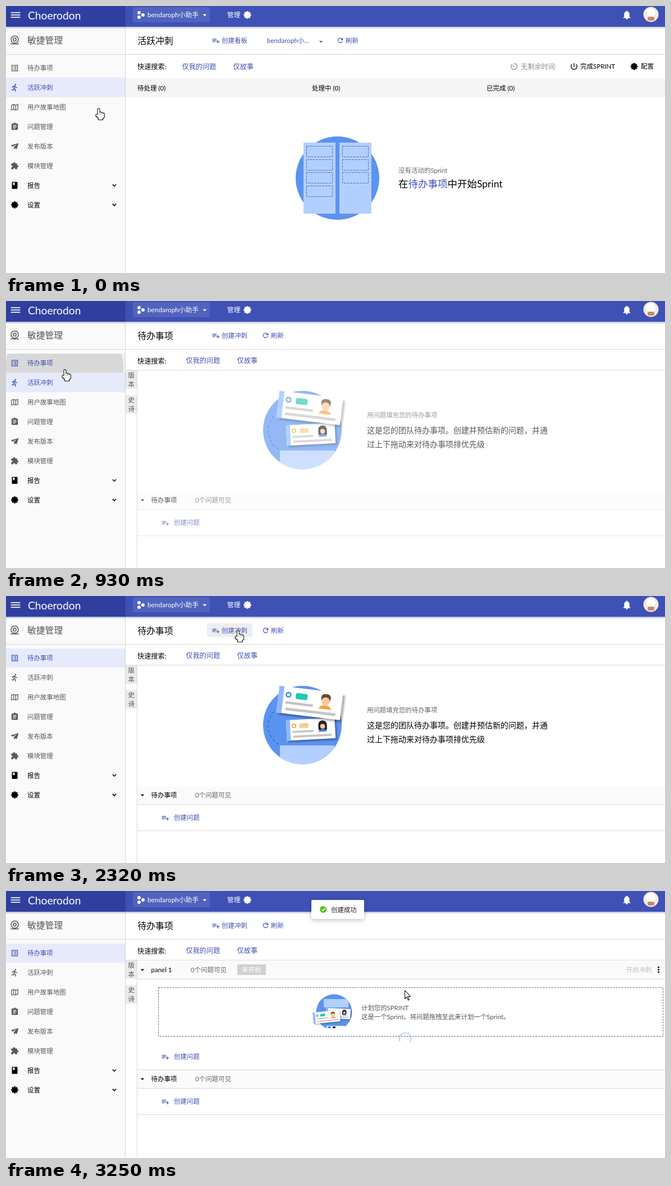
Recreate the animation shown at these times as an HTML page with a canvas. Size 1174 by 477 pixels, loop 3.32 s.

```html
<!DOCTYPE html>
<html lang="zh-CN">
<head>
<meta charset="utf-8">
<title>待办事项</title>
<style>
html, body { margin: 0; width: 100%; height: 100%; overflow: hidden; background: #fff; }
canvas { display: block; width: 1174px; height: 477px; }
</style>
</head>
<body>
<canvas id="c" width="1174" height="477"></canvas>
<script>
const g = document.getElementById('c').getContext('2d');
const FONT = 'Lato, "Noto Sans CJK SC", "Noto Sans CJK", sans-serif';
const LOOP = 3320, STEP = LOOP / 43;
const BLUE = '#3f51b5', SKY = '#5b93f0', PALE = '#b3cfff', GREY = '#595959', LINE = '#d8d8d8';
const OPEN = 770, CREATED = 2940;

const ramp = (t, a, b) => Math.min(1, Math.max(0, (t - a) / (b - a)));
const pulse = (t, a, b, c, d) => ramp(t, a, b) - ramp(t, c, d);
const tint = k => `rgb(${89 - 26 * k},${89 - 8 * k},${89 + 92 * k})`;

function rect(x, y, w, h, c) { g.fillStyle = c; g.fillRect(x, y, w, h); }
function round(x, y, w, h, r, c) { g.fillStyle = c; g.beginPath(); g.roundRect(x, y, w, h, r); g.fill(); }
function disc(x, y, r, c) { g.fillStyle = c; g.beginPath(); g.arc(x, y, r, 0, 7); g.fill(); }
function arc(x, y, r, a, b, c, w) {
  g.strokeStyle = c; g.lineWidth = w; g.beginPath(); g.arc(x, y, r, a, b); g.stroke();
}
function ring(x, y, r, c, w) { arc(x, y, r, 0, 7, c, w); }
function trace(p) {
  g.beginPath();
  for (let i = 0; i < p.length; i += 2) g.lineTo(p[i], p[i + 1]);
}
function line(c, w, ...p) { g.strokeStyle = c; g.lineWidth = w; trace(p); g.stroke(); }
function poly(c, ...p) { g.fillStyle = c; trace(p); g.fill(); }
function dashed(pattern, paint) { g.setLineDash(pattern); paint(); g.setLineDash([]); }
function frame(x, y, w, h, c, lw = 1) { g.strokeStyle = c; g.lineWidth = lw; g.strokeRect(x, y, w, h); }
function place(x, y, scale, angle, paint) {
  g.save(); g.translate(x, y); g.rotate(angle); g.scale(scale, scale); paint(); g.restore();
}
function clipTo(path, paint) { g.save(); g.beginPath(); path(); g.clip(); paint(); g.restore(); }
function text(s, x, y, size, c, weight = 400) {
  g.font = `${weight} ${size}px ${FONT}`;
  g.fillStyle = c;
  g.fillText(s, x, y + size * .37);
}

// icons live on a grid of 24 units centred on 0,0
const ICON = {
  menu(c) { for (const y of [-6, -1, 4]) rect(-10, y, 20, 2, c); },
  list(c) {
    frame(-8, -8, 16, 16, c, 2);
    for (const y of [-5, -1, 3]) { rect(-5, y, 2, 2, c); rect(-1, y, 6, 2, c); }
  },
  run(c) {
    disc(2, -8.5, 2.1, c);
    line(c, 2.2, -6, 1, -6, -3, 0, -5, 3, -1, 7, 0);
    line(c, 2.4, 0, -5, -2, 2, 2, 5, 2, 11);
    line(c, 2.2, -2, 2, -3.5, 7, -9, 6);
  },
  map(c) {
    line(c, 2, -9, -6, -3, -8, 3, -6, 9, -8, 9, 6, 3, 8, -3, 6, -9, 8, -9, -7);
    line(c, 2, -3, -8, -3, 6);
    line(c, 2, 3, -6, 3, 8);
  },
  task(c) {
    round(-9, -9, 18, 18, 2, c); disc(0, -9, 3, c);
    for (let i = 0; i < 3; i++) rect(-5, -5 + 4 * i, i < 2 ? 10 : 7, 2, '#fafafa');
  },
  plane(c) { poly(c, 11, -9, -11, -3, -6, 1, 6, -6, -2, 2, -2, 10, 1, 6, 6, 8); },
  puzzle(c) {
    round(-10, -7, 17, 17, 2, c);
    disc(-1.5, -7.5, 3, c); disc(7.5, 1.5, 3, c);
    disc(-9, 1.5, 2.7, '#fafafa'); disc(-1.5, 9, 2.7, '#fafafa');
  },
  book(c) { round(-8, -10, 16, 20, 2, c); poly('#fff', -5, -8, 0, -8, 0, 0, -2.5, -2, -5, 0); },
  gear(c) {
    for (let i = 0; i < 4; i++) place(0, 0, 1, i * Math.PI / 4, () => rect(-2.5, -10, 5, 20, c));
    ring(0, 0, 5.5, c, 4);
  },
  add(c) {
    for (let i = 0; i < 3; i++) rect(-11, -6 + 4 * i, i < 2 ? 13 : 9, 2, c);
    rect(1, 2, 10, 2, c); rect(5, -2, 2, 10, c);
  },
  refresh(c) { arc(0, 0, 7, .3, 5.5, c, 2); poly(c, 8, -8, 8, -1, 1, -1); },
  bell(c) { round(-6, -8, 12, 14, [6, 6, 0, 0], c); rect(-8, 5, 16, 2, c); disc(0, -8, 1.6, c); disc(0, 8, 2, c); },
  down(c) { line(c, 2.6, -5.5, -2, 0, 3.5, 5.5, -2); },
  caret(c) { poly(c, -6, -3, 6, -3, 0, 3); },
  power(c) { arc(0, 0, 8, -.8, 3.94, c, 2); rect(-1, -9, 2, 10, c); },
  clock(c) { arc(0, 0, 8, -1.5, 3.9, c, 2); line(c, 2, -4, -4, 1, 1); }
};
function icon(name, x, y, size, c) { place(x, y, size / 24, 0, () => ICON[name](c)); }
function link(name, label, x, y) {
  icon(name, x, y, 14, BLUE);
  text(label, x + (name === 'add' ? 10 : 9.5), y, 11.5, BLUE);
}

function header() {
  const fade = g.createLinearGradient(0, 37, 0, 41);
  fade.addColorStop(0, 'rgba(63,81,150,.4)');
  fade.addColorStop(1, 'rgba(63,81,150,0)');
  rect(0, 37, 1174, 4, fade);
  rect(0, 0, 1174, 37, BLUE);
  rect(0, 0, 213, 37, '#303f9f');
  icon('menu', 17, 16, 20, '#fff');
  text('Choerodon', 39, 17, 19.2, '#fff');
  round(226, 2, 137, 27, 2, '#5263bd');
  disc(237, 12, 3, '#fff'); disc(237, 20, 3, '#fff'); disc(244, 16, 3, '#fff');
  text('bendaroph小助手', 252, 16, 11.8, '#fff');
  icon('caret', 354, 16.5, 14, '#fff');
  text('管理', 394, 16, 11.8, '#fff', 500);
  icon('gear', 430, 16, 16, '#fff');
  icon('bell', 1106, 16, 19, '#fff');
  disc(1149, 15, 13.5, '#f3e9e4');
  disc(1149, 12, 8, '#fff');
  round(1143, 19, 12, 7, 3, '#c98a68');
}

const ITEMS = { list: '待办事项', run: '活跃冲刺', map: '用户故事地图', task: '问题管理',
  plane: '发布版本', puzzle: '模块管理', book: '报告', gear: '设置' };

function ripple(t) {
  clipTo(() => g.rect(0, 94, 212, 34), () => {
    g.globalAlpha = pulse(t, 610, 612, 930, 1160);
    disc(104, 122, 15 + 90 * ramp(t, 600, 926), '#d8d8d8');
  });
}

function sidebar(t) {
  rect(0, 37, 212, 440, '#fafafa');
  rect(212, 37, 1, 440, '#d3d3d3');
  ring(15.5, 60, 6.5, GREY, 1.5); ring(15.5, 60, 2.7, GREY, 1.5);
  rect(8, 67, 15, 1.5, GREY);
  text('敏捷管理', 38, 61, 15.8, '#555');
  const moved = t > 1070;
  if (moved) rect(0, 94, 212, 34, t < 1400 ? '#dde0ee' : '#e7eafb');
  else {
    if (t > 300) rect(0, 94, 212, 34, '#f0f0f0');
    rect(0, 128, 212, 35, '#e7eafb');
  }
  ripple(t);
  const glow = { list: ramp(t, 240, 380), run: 1 - ramp(t, 1250, 1550), map: .7 * pulse(t, 60, 160, 240, 380) };
  Object.entries(ITEMS).forEach(([name, label], i) => {
    const y = 111 + 34.9 * i, strong = i > 5, c = strong ? '#000' : tint(glow[name] || 0);
    icon(name, 15.5, y, 15, c);
    text(label, 38, y, 11.45, c, strong ? 500 : 400);
    if (strong) icon('down', 193, y - .5, 14, '#000');
  });
}

function filters(x, y, labelY) {
  text('快速搜索:', 234, labelY, 12.2, '#000');
  text('仅我的问题', x, y, 12.2, BLUE);
  text('仅故事', x + 91, y, 12.2, BLUE);
}

function board() {
  disc(590.5, 307.5, 74.5, SKY);
  for (let col = 0; col < 2; col++) {
    const x = 530 + 64 * col;
    rect(x, 244, 57, 127, PALE);
    dashed([4, 1.5], () => {
      for (let r = 0; r < 4 - col; r++) frame(x + 5.5, 250.5 + Math.round(23.7 * r), 46, 19, '#4674c6');
    });
  }
}

function sprintPage() {
  text('活跃冲刺', 234.5, 62, 15.8, '#000');
  link('add', '创建看板', 374, 62);
  text('bendaroph小...', 465, 62, 11.6, BLUE);
  icon('caret', 561, 64, 13, BLUE);
  link('refresh', '刷新', 595.5, 61.5);
  filters(313.5, 108, 108);
  icon('clock', 905, 108, 16, '#8c8c8c');
  text('无剩余时间', 917, 108, 12.2, '#8c8c8c');
  icon('power', 1012, 108, 16, '#000');
  text('完成SPRINT', 1023, 108, 11.5, '#000');
  icon('gear', 1119, 108, 15, '#000');
  text('配置', 1131, 108, 11.5, '#000', 500);
  rect(213, 129, 961, 34, '#f5f5f5');
  ['待处理', '处理中', '已完成'].forEach((s, i) => text(s + ' (0)', 234 + 311 * i, 147, 11.5, '#000'));
  board();
  text('没有活动的Sprint', 699, 294, 11.5, '#666');
  text('在', 699, 317.5, 17.5, '#000');
  text('待办事项', 716.5, 317.5, 17.5, BLUE);
  text('中开始Sprint', 786.5, 317.5, 17.5, '#000');
}

function backlogBar(t) {
  text('待办事项', 234.5, 62, 15.8, '#000');
  const press = ramp(t, 2410, 2570);
  if (t > 1840 && t < 2860) round(358 - press, 49 - press, 81 + 2 * press, 24 + 2 * press, 2, press ? '#d6d6d6' : '#eee');
  link('add', '创建冲刺', 374, 62);
  link('refresh', '刷新', 462.5, 61.5);
  filters(320.5, 106, 107.5);
  rect(213, 123, 961, 1, LINE);
  rect(233, 124, 1, 353, LINE);
  ['版本', '史诗'].forEach((s, i) => {
    const y = 124 + 44 * i;
    rect(213, y, 20, 33, '#eaeaea');
    [...s].forEach((ch, j) => text(ch, 217.5, y + 9 + 16 * j, 11.5, '#555'));
  });
}

function group(y, name, count, x) {
  rect(234, y - 16, 940, 32, '#fafafa');
  rect(234, y + 16, 940, 1, LINE);
  icon('caret', 243, y, 13, '#000');
  text(name, 258.5, y, 11.5, '#000');
  text(count, x, y, 11.5, '#666');
}
function addIssue(y, bottom) {
  icon('add', 284, y + .5, 14, BLUE);
  text('创建问题', 299, y, 11.5, BLUE);
  rect(234, bottom, 940, 1, LINE);
}
function backlogGroup(y) {
  group(y, '待办事项', '0个问题可见', 337);
  addIssue(y + 40, y + 63);
}

function man() {
  g.fillStyle = '#f5a540';
  g.beginPath(); g.ellipse(0, 15, 11, 7, 0, Math.PI, 0); g.fill();
  rect(-3, 4, 6, 6, '#f0b183');
  round(-8.5, -12, 17, 14, 6, '#6b4630');
  round(-7, -6, 14, 14, 6, '#fbc79c');
}
function woman() {
  round(-10, -12, 20, 22, [9, 9, 2, 2], '#23202c');
  g.fillStyle = '#4b7de0';
  g.beginPath(); g.ellipse(0, 14, 10, 6, 0, Math.PI, 0); g.fill();
  round(-5.5, -4, 11, 11, 5, '#fbc79c');
}
function card(x, y, scale, angle, mark, tag, face) {
  place(x, y, scale, angle, () => {
    g.save();
    g.shadowColor = 'rgba(0,0,0,.3)'; g.shadowBlur = 3; g.shadowOffsetX = 4 * scale; g.shadowOffsetY = 4 * scale;
    rect(-57, -24, 114, 48, '#fff');
    g.restore();
    rect(-57, -24, 9, 48, '#8fb8ff');
    ring(-39, -10, 4, mark, 2.5);
    round(-26, -15, 21, 11, 3, tag);
    rect(-43, 2, 49, 4.5, '#c4c4c4');
    rect(-42, 13, 90, 5, '#c4c4c4');
    place(28, -7, 1, 0, face);
  });
}
const blueCard = (x, y, scale, angle) => card(x, y, scale, angle, '#4b84e6', '#22c9b4', man);
const tanCard = (x, y, scale, angle) => card(x, y, scale, angle, '#f5a540', '#f8cd8a', woman);

function emptyBacklog() {
  disc(528, 230.5, 70, SKY);
  dashed([5, 4], () => arc(505, 232, 38, 2.1, 3.9, '#3568b8', 1.5));
  clipTo(() => g.arc(528, 230.5, 70, 0, 7), () => rect(488, 267, 97, 40, PALE));
  tanCard(543, 238, .76, -.05);
  blueCard(541, 191, 1, .12);
  text('用问题填充您的待办事项', 643, 203.5, 11.4, '#666');
  text('这是您的团队待办事项。创建并预估新的问题，并通', 643, 231, 14, '#000');
  text('过上下拖动来对待办事项排优先级', 643, 256, 14, '#000');
  backlogGroup(356);
}

function sprintBacklog() {
  group(141, 'panel 1', '0个问题可见', 329);
  rect(412, 131, 51, 19, '#d0d0d0');
  text('未开始', 420, 141, 11.5, '#fff', 500);
  text('开启冲刺', 1104.5, 141, 11.5, '#bfbfbf');
  for (let i = -1; i < 2; i++) disc(1162.5, 140.5 + 4.3 * i, 1.5, '#000');
  dashed([3, 2], () => frame(271.5, 172.5, 899, 87, '#666'));
  clipTo(() => g.arc(584.5, 216.5, 32, 0, 7), () => {
    rect(552, 184, 66, 66, SKY);
    rect(566, 193, 44, 15, PALE);
    tanCard(592, 219, .38, .05);
    rect(571, 241, 32, 8, '#fff');
    rect(573, 242, 6, 3, '#4b84e6'); rect(582, 242, 5, 3, '#23202c');
  });
  blueCard(571, 225, .42, -.1);
  text('计划您的SPRINT', 633, 208.5, 11.4, '#555');
  text('这是一个Sprint。将问题拖拽至此来计划一个Sprint。', 633, 225, 11.4, '#555');
  addIssue(296, 319);
  backlogGroup(336);
}

function spinner(t) {
  const again = t > 2000;
  g.globalAlpha = again ? ramp(t, 2700, 2860) - .65 * ramp(t, 3090, 3240) : pulse(t, 930, 1080, 1240, 1420);
  const turn = again ? 2.6 + (t - 3240) * .0063 : .7 + (t - 1235) * .0063;
  arc(711, 264, 10.5, turn, turn + (again ? 4.3 : 2.4), '#4a82e0', 2);
  g.globalAlpha = 1;
}

function toast(t) {
  const k = ramp(t, 2780, 3000);
  if (!k) return;
  place(544, 50 * k - 34, 1, 0, () => {
    g.globalAlpha = k;
    g.shadowColor = 'rgba(0,0,0,.25)'; g.shadowBlur = 8; g.shadowOffsetY = 2;
    round(0, 0, 94, 34, 2, '#fff');
    g.shadowColor = 'transparent';
    disc(21, 17, 6, '#52c41a');
    line('#fff', 1.5, 18, 17, 20.5, 19.5, 24.5, 14.5);
    text('创建成功', 35, 17.5, 11.4, '#222');
  });
}

// stops of the pointer: time, x, y
const PATH = [[0, 165, 182.5], [386, 105, 119.5], [463, 105, 122], [1080, 105, 122], [1235, 157, 125],
  [1621, 418, 97], [1920, 402, 56], [2410, 416, 62.5], [2700, 416, 62.5], [3090, 583, 134], [3240, 710.5, 177.5]];

function pointerAt(t) {
  let [, x, y] = PATH[0];
  for (let i = 1; i < PATH.length; i++) {
    const k = ramp(t, PATH[i - 1][0], PATH[i][0]);
    x += (PATH[i][1] - x) * k;
    y += (PATH[i][2] - y) * k;
  }
  return [x, y];
}
function hand() {
  for (const [grow, c] of [[.5, '#111'], [-.6, '#fff']]) {
    const part = (x, y, w, h) => round(x - grow, y - grow, w + 2 * grow, h + 2 * grow, 2, c);
    part(-2, .5, 4, 15);
    for (let i = 0; i < 3; i++) part(1.2 + 2.8 * i, 6.5 + i, 3.6, 9);
    part(-5, 10.5, 4, 5);
    part(-3, 11, 13, 6);
    part(-1, 14, 9, 7);
  }
}
function pointer(t) {
  const [x, y] = pointerAt(t);
  place(x, y, 1, 0, () => {
    if (x < 212 || (x > 358 && x < 440 && y < 74)) hand();
    else {
      const tip = [0, 0, 0, 15, 3.5, 12, 6, 17.5, 8, 16.5, 5.5, 11, 10, 11, 0, 0];
      poly('#fff', ...tip);
      line('#111', 1.1, ...tip);
    }
  });
}

function draw(t) {
  rect(0, 0, 1174, 477, '#fff');
  sidebar(t);
  rect(0, 86, 1174, 1, LINE);
  if (t < OPEN) sprintPage();
  else {
    backlogBar(t);
    if (t < CREATED) emptyBacklog(); else sprintBacklog();
    const veil = pulse(t, OPEN, 1000, 1160, 1235) + pulse(t, 2700, 2860, CREATED, 3090);
    rect(234, 124, 940, 353, `rgba(255,255,255,${veil / 2})`);
  }
  spinner(t);
  header();
  toast(t);
  pointer(t);
}

const start = performance.now();
function tick() {
  const t = (performance.now() - start) % LOOP;
  draw(Math.floor((t + 12) / STEP) * STEP);
  requestAnimationFrame(tick);
}
tick();
</script>
</body>
</html>
```
